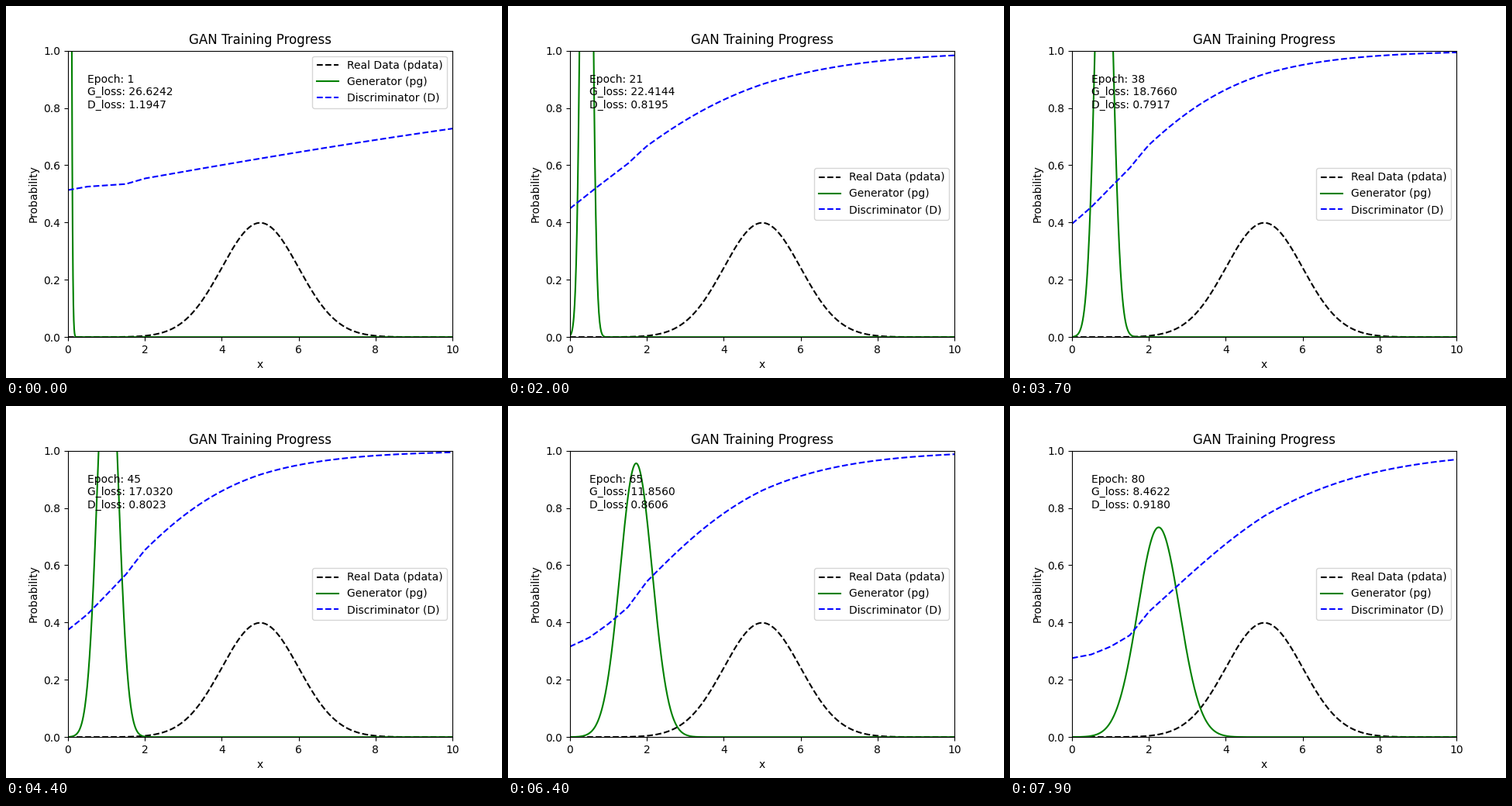
A matplotlib script for the animation above (8 s loop, 640 px wide and 480 px high).

```python
import numpy as np
import matplotlib.pyplot as plt
from matplotlib.animation import FuncAnimation

EPOCHS = 80
BATCH_MEAN = 5.164
KNOTS = np.array([0, 0.5, 1, 1.5, 2, 5, 10])  # kinks of the discriminator


def ramp(epoch, start, width):
    """Zero before start, then rising by one per epoch, with a soft corner."""
    return width * np.log1p(np.exp((epoch - start) / width))


def normal(x, mu, sigma):
    return np.exp(-0.5 * ((x - mu) / sigma) ** 2) / (sigma * np.sqrt(2 * np.pi))


def generator(epoch):
    """Mean and spread, both drifting faster as training goes on."""
    mu = 0.004 + 0.0211 * (epoch - 1) + 0.0146 * ramp(epoch, 40, 6)
    sigma = 0.044 + 0.003 * (epoch - 1) + 0.0056 * ramp(epoch, 33, 10)
    return mu, sigma


def discriminator(epoch):
    """Sigmoid over a piecewise linear logit, returned as a function of x."""
    fade = np.exp(-(epoch - 1) / 24)
    late = ramp(epoch, 44, 5)
    slope = 0.096 + 0.61 * (1 - fade) - 0.0054 * late
    bends = np.array([
        -0.0065 * ramp(epoch, 24, 4),
        -0.06 * fade - 0.0063 * late,
        -0.06 * fade - 0.0037 * late,
        0.06 + 0.0018 * epoch,
        0,
        -0.045 * (1 - fade),
    ])
    rise = np.cumsum((slope + bends) * np.diff(KNOTS))
    logits = 0.066 - 0.0129 * epoch + np.concatenate([[0], rise])
    return lambda x: 1 / (1 + np.exp(-np.interp(x, KNOTS, logits)))


def losses(mu, sigma, prob):
    """Squared distance of the means, and expected cross entropy."""
    z = np.linspace(-4, 4, 201)
    weight = normal(z, 0, 1)
    entropy = -np.log(prob(5 + z)) - np.log(1 - prob(mu + sigma * z))
    return (BATCH_MEAN - mu) ** 2, np.average(entropy, weights=weight)


x = np.linspace(0, 10, 1000)
fig, ax = plt.subplots(figsize=(6.4, 4.8), dpi=100)
ax.plot(x, normal(x, 5, 1), "k--", label="Real Data (pdata)")
gen, = ax.plot([], [], "g-", label="Generator (pg)")
disc, = ax.plot([], [], "b--", label="Discriminator (D)")
info = ax.text(0.5, 0.8, "")
ax.set(xlim=(0, 10), ylim=(0, 1), xlabel="x", ylabel="Probability",
       title="GAN Training Progress")
ax.legend(loc="best")


def update(n):
    epoch = n + 1
    mu, sigma = generator(epoch)
    prob = discriminator(epoch)
    g_loss, d_loss = losses(mu, sigma, prob)
    gen.set_data(x, normal(x, mu, sigma))
    disc.set_data(x, prob(x))
    info.set_text(f"Epoch: {epoch}\nG_loss: {g_loss:.4f}\nD_loss: {d_loss:.4f}")
    return gen, disc, info


anim = FuncAnimation(fig, update, frames=EPOCHS, interval=100, repeat=True)
plt.show()
```
